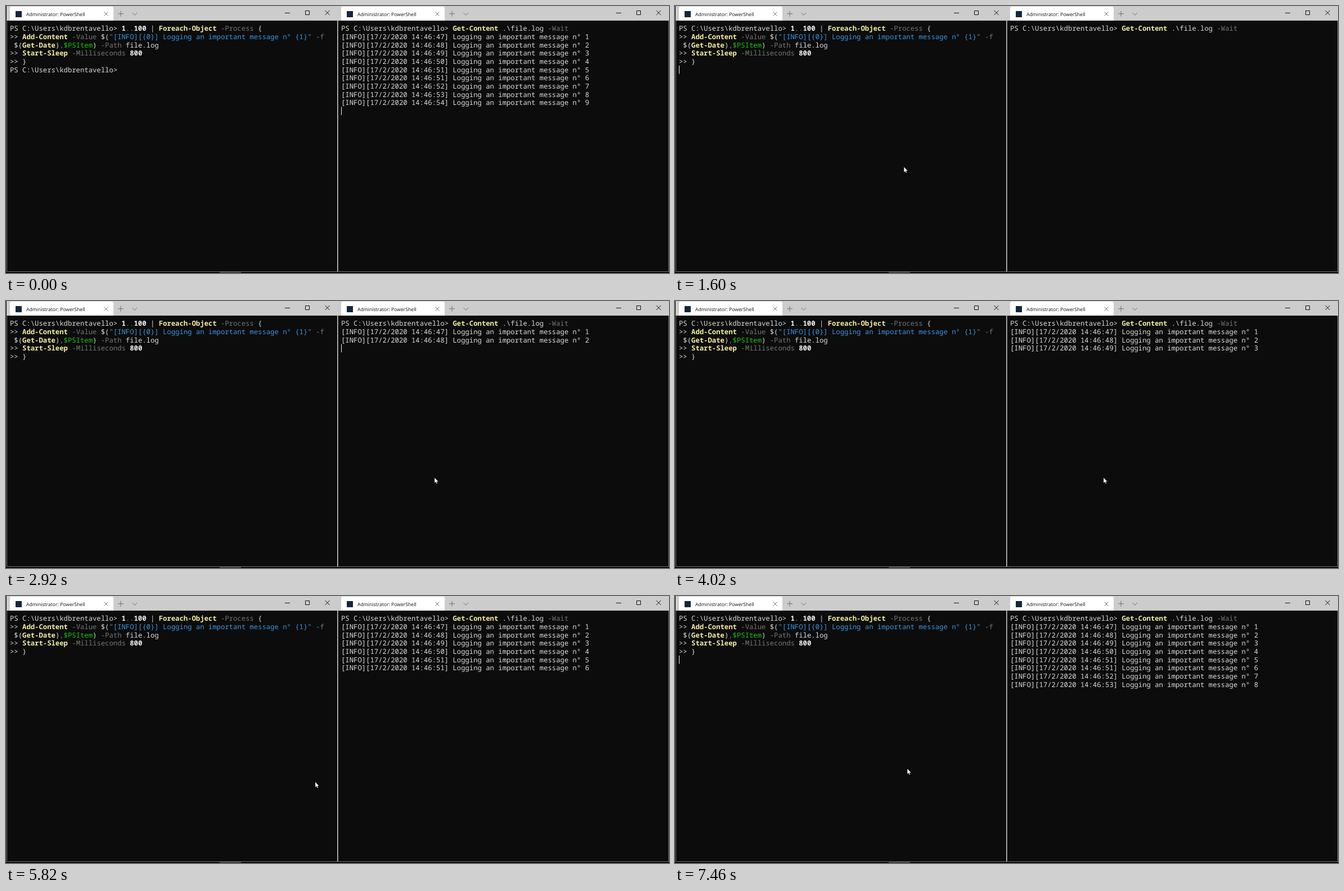
Recreate the animation shown at these times as an HTML page. Size 1179 px wide and 475 px high, loop 8 s.

```html
<!DOCTYPE html>
<html lang="en">
<head>
<meta charset="utf-8">
<title>Two terminals following a log</title>
<style>
  html, body { margin: 0; width: 100%; height: 100%; overflow: hidden; background: #050505; }
  svg { display: block; width: 100%; height: 100%; }
  text { white-space: pre; text-rendering: geometricPrecision; }
  .code { font: 500 12.267px "Noto Sans Mono", "DejaVu Sans Mono", monospace; fill: #dcdcdc; font-variant-ligatures: none; }
  .title { font: 8.63px "Open Sans", "Noto Sans", sans-serif; fill: #111; }
  .command { fill: #f9f1a5; font-weight: 600; }
  .number { fill: #f2f2f2; font-weight: 600; }
  .option { fill: #767676; }
  .string { fill: #3a96dd; }
  .variable { fill: #16c60c; }
  .thin { fill: none; stroke: #666; stroke-width: .9; }
  .button { fill: none; stroke: #111; }
  .caret { fill: #f2f2f2; }
</style>
</head>
<body>
<svg id="stage" viewBox="0 0 1179 475"></svg>
<script>
const LOOP = 8000, CHAR = 7.36, ROW = 14.667, TOP = 32.67, PANE = 589;
const BLINK = 560, LOG_GAP = 820, LOG_START = 1660, LOG_COUNT = 9;
const CLEARED = 70, LEFT_FOCUS = 1140, RUN = 1600, RIGHT_FOCUS = 2380, FOLLOW = 2920, LEFT_AGAIN = 7460;

const span = kind => text => `<tspan class="${kind}">${text}</tspan>`;
const [command, number, option, string, variable] =
  ['command', 'number', 'option', 'string', 'variable'].map(span);

const colX = col => 7 + col * CHAR;
const rowY = row => TOP + row * ROW;
const line = (row, content, col = 0, id = '') =>
  `<text class="code" id="${id}" x="${colX(col)}" y="${rowY(row) + 11.65}">${content}</text>`;

const prompt = 'PS C:\\Users\\kdbrentavello&gt;';

const leftLines = [
  line(0, `${prompt} ${number('1')}${option('..')}${number('100')} | ${command('Foreach-Object')} ${option('-Process')} {`),
  line(1, `&gt;&gt; ${command('Add-Content')} ${option('-Value')} $(${string('"[INFO][{0}] Logging an important message n° {1}"')} ${option('-f')}`),
  line(2, `$(${command('Get-Date')})${option(',')}${variable('$PSItem')}) ${option('-Path')} file.log`, 1),
  line(3, `&gt;&gt; ${command('Start-Sleep')} ${option('-Milliseconds')} ${number('800')}`),
  line(4, '&gt;&gt; }'),
  line(5, prompt, 0, 'finalPrompt'),
].join('');

const logLine = n => {
  const second = Math.floor(47.8 + (n - 1) * LOG_GAP / 1000);
  return line(n, `[INFO][17/2/2020 14:46:${second}] Logging an important message n° ${n}`, 0, `log${n}`);
};
const logNumbers = Array.from({ length: LOG_COUNT }, (_, i) => i + 1);
const rightLines = line(0, `${prompt} ${command('Get-Content')} .\\file.log ${option('-Wait')}`) +
  logNumbers.map(logLine).join('');

const pane = (x, lines, caretId) => `
  <g transform="translate(${x})">
    <rect x="1" width="588" height="473" fill="#0c0c0c"/>
    <rect x="1" width="589" height="26" fill="#ccc"/>
    <path d="M7 26V4q0-3 3-3H188q3 0 3 3V26z" fill="#fff"/>
    <rect x="17" y="9" width="11" height="11" fill="#14263c"/>
    <text class="title" x="36" y="17.7">Administrator: PowerShell</text>
    <path class="thin" d="M174.5 10.5l7 7m0-7l-7 7M199 13.8h10m-5-5v10M224.5 12l4.3 4.3 4.3-4.3"/>
    <path class="button" d="M496 12.5h9M532.5 8.5h7v7h-7zM567.5 8l8 8m0-8l-8 8"/>
    <path d="M1.5 26V472.5H589" fill="none" stroke="#777"/>
    ${lines}
    <rect class="caret" id="${caretId}" width="1" height="${ROW}"/>
  </g>`;

document.getElementById('stage').innerHTML = `
  <rect width="1179" height="475" fill="#050505"/>
  ${pane(0, leftLines, 'leftCaret')}
  ${pane(PANE, rightLines, 'rightCaret')}
  <path d="M589.5 0V473" stroke="#ccc"/>
  <path d="M1178.5 26V473" stroke="#777"/>
  <rect id="taskMark" y="473" width="38" height="2" fill="#3c3c3c"/>
  <path id="pointer" d="M0 0V10L2.3 7.9 3.8 11.2 5.4 10.5 4 7.4H7z" fill="#fff" stroke="#000" stroke-width=".5"/>`;

const $ = id => document.getElementById(id);
const show = (id, visible) => $(id).setAttribute('visibility', visible ? 'visible' : 'hidden');
const move = (id, x, y) => $(id).setAttribute('transform', `translate(${x} ${y})`);

// The pointer rests between moves; a move may sag below the straight line.
const pointerStart = { x: 1039, y: 443 };
const pointerMoves = [
  { start: 290, end: 460, x: 694, y: 269, sag: 0 },
  { start: 680, end: 760, x: 407, y: 286, sag: 0 },
  { start: 2000, end: 2150, x: 762, y: 314, sag: 0 },
  { start: 5590, end: 5970, x: 413, y: 307, sag: 22 },
];

function pointerAt(time) {
  let { x, y } = pointerStart;
  for (const leg of pointerMoves) {
    const p = Math.min(1, Math.max(0, (time - leg.start) / (leg.end - leg.start)));
    x += (leg.x - x) * p;
    y += (leg.y - y) * p + leg.sag * Math.sin(Math.PI * p);
  }
  return [x, y];
}

function drawCaret(id, focused, time, since, col, row) {
  show(id, focused && Math.floor((time - since) / BLINK) % 2 === 0);
  move(id, Math.round(colX(col)), rowY(row));
}

function draw(time) {
  const finished = time < CLEARED;
  const running = time >= RUN, following = time >= FOLLOW;
  const written = Math.floor((time - LOG_START) / LOG_GAP) + 1;
  const shown = finished ? LOG_COUNT : following ? written : 0;

  show('finalPrompt', finished);
  logNumbers.forEach(n => show(`log${n}`, n <= shown));

  const leftFocused = time >= LEFT_FOCUS && time < RIGHT_FOCUS || time >= LEFT_AGAIN;
  const leftSince = time >= LEFT_AGAIN ? LEFT_AGAIN : running ? RUN : LEFT_FOCUS;
  drawCaret('leftCaret', leftFocused, time, leftSince, running ? 0 : 4, running ? 5 : 4);

  const rightFocused = finished || time >= RIGHT_FOCUS && time < LEFT_AGAIN;
  const rightSince = finished ? 0 : following ? FOLLOW : RIGHT_FOCUS;
  const waiting = !finished && !following;
  drawCaret('rightCaret', rightFocused, time, rightSince, waiting ? 55 : 0, shown && shown + 1);

  $('taskMark').setAttribute('x', finished || time >= LEFT_FOCUS ? 380 : 609);
  show('pointer', time >= pointerMoves[0].start);
  move('pointer', ...pointerAt(time));
}

const startTime = performance.now();
function tick() {
  draw((performance.now() - startTime) % LOOP);
  requestAnimationFrame(tick);
}
tick();
</script>
</body>
</html>
```
